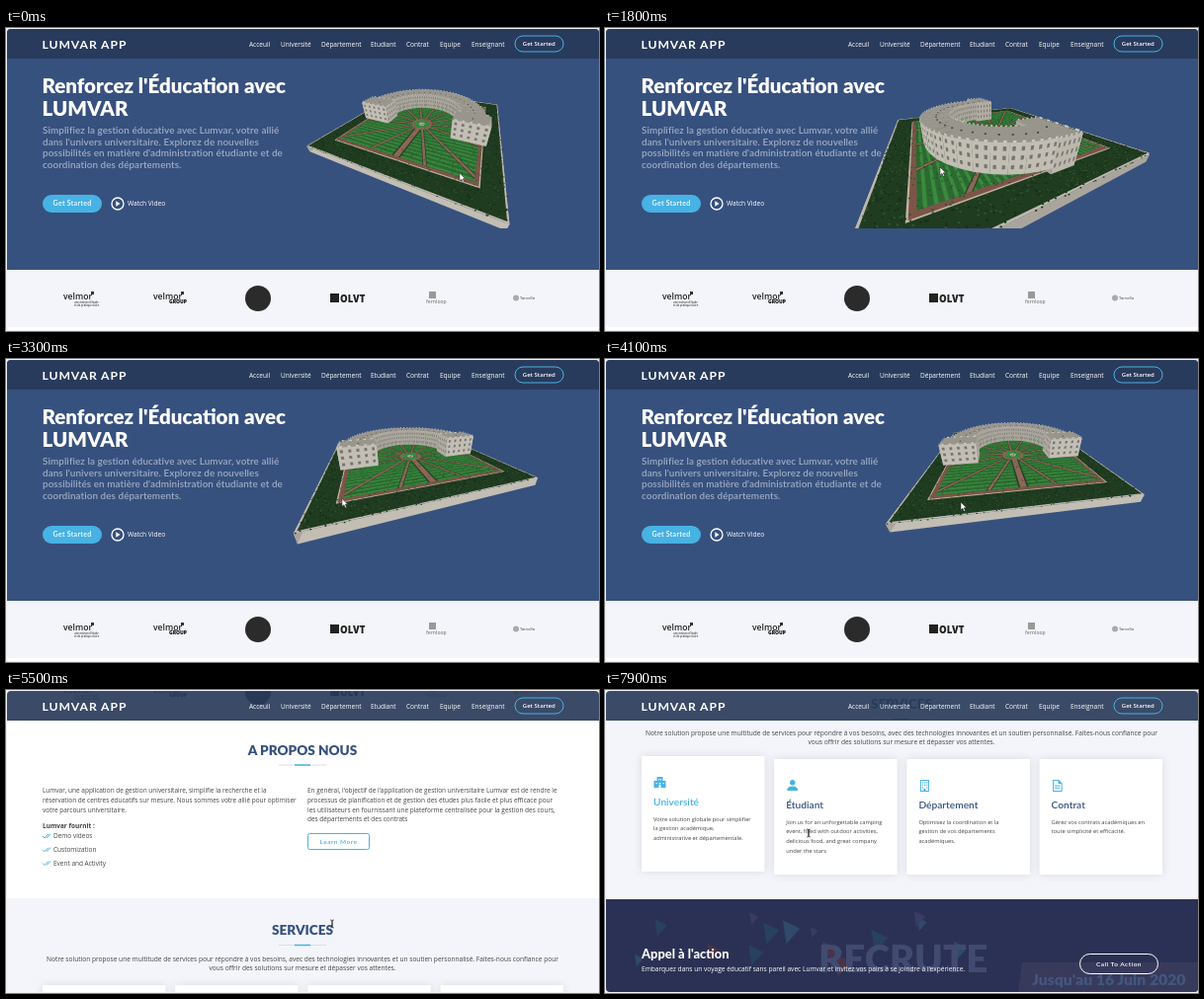
An HTML page with a canvas that plays this animation: 600 by 307 pixels, repeating every 8000 ms.

```html
<!DOCTYPE html>
<html lang="fr">
<head>
<meta charset="utf-8">
<style>
html, body { margin: 0; width: 600px; height: 307px; overflow: hidden; background: #f1f1f1; }
#stage { position: absolute; left: 1px; top: 1px; width: 599px; height: 305px; overflow: hidden; border-radius: 4px; background: #fff; }
#page, svg, canvas { position: absolute; left: 0; top: 0; }
#stage > * { margin: -1px 0 0 -1px; }
svg { overflow: visible; }
text { font-family: "Open Sans", sans-serif; font-size: 6.47px; fill: #444; white-space: pre; }
.j { font-family: Lato, sans-serif; }
.w, .w text { fill: #fff; }
.nav text { font-weight: 500; font-size: 6.5px; }
.title text { font-size: 20.5px; font-weight: 900; }
.lead text { font-size: 9.9px; font-weight: 600; fill: #9dabc4; letter-spacing: .08px; }
.head { font-weight: 900; font-size: 13.6px; fill: #37517e; text-anchor: middle; }
.intro { font-size: 6.6px; text-anchor: middle; }
.mid { text-anchor: middle; }
.tiny { font-size: 2.6px; }
.sky { fill: #47b2e4; }
.line { fill: none; stroke: #47b2e4; }
.card rect.box { fill: #fff; filter: drop-shadow(0 0 4px #0000001c); }
.card .j { font-size: 10.2px; fill: #37517e; font-weight: 600; }
.card text:not(.j) { font-size: 5.72px; }
</style>
</head>
<body>
<div id="stage">
<div id="page">
<svg width="600" height="900">
  <rect width="600" height="245" fill="#37517e"/>
  <g class="w title">
    <text class="j" x="36.5" y="66">Renforcez l'Éducation avec</text>
    <text class="j" x="36.5" y="89">LUMVAR</text>
  </g>
  <g class="lead">
    <text class="j" x="37" y="107">Simplifiez la gestion éducative avec Lumvar, votre allié</text>
    <text class="j" x="37" y="118.6">dans l'univers universitaire. Explorez de nouvelles</text>
    <text class="j" x="37" y="130.2">possibilités en matière d'administration étudiante et de</text>
    <text class="j" x="37" y="141.8">coordination des départements.</text>
  </g>
  <rect class="sky" x="37" y="169" width="60" height="18" rx="9"/>
  <text class="j w mid" x="67" y="180.4" style="font-size:7px" font-weight="600" letter-spacing=".3">Get Started</text>
  <circle cx="113" cy="178" r="6" fill="none" stroke="#fff" stroke-width="1.3"/>
  <path d="M111.3 175.3l4.2 2.7-4.2 2.7z" fill="#fff"/>
  <text class="w" x="123" y="180.3" style="font-size:6.6px" font-weight="500">Watch Video</text>

  <rect y="245" width="600" height="58" fill="#f3f5fa"/>
  <g font-weight="600">
    <text x="58" y="274.5" style="font-size:8.6px;fill:#222">velmor</text><rect x="86" y="267" width="3" height="3" fill="#333"/>
    <text class="tiny" x="69" y="278.6">une maison d'étude</text><text class="tiny" x="69" y="281.8">et de pratique claire</text>
    <text x="149" y="274.5" style="font-size:8.6px;fill:#222">velmor</text><rect x="177" y="267" width="3" height="3" fill="#333"/>
    <text x="165" y="279" style="font-size:5px;fill:#111" font-weight="800">GROUP</text>
    <circle cx="255" cy="274" r="13" fill="#2b2b2b"/>
    <rect x="328" y="269" width="9" height="9" fill="#222"/>
    <text x="338" y="277.6" style="font-size:9.6px;fill:#222" font-weight="800">OLVT</text>
    <rect x="428" y="267" width="7" height="7" fill="#999"/>
    <text x="425" y="279" style="font-size:5px;fill:#888">fernloop</text>
    <circle cx="516" cy="273.5" r="3" fill="#aaa"/>
    <text x="520" y="275" style="font-size:4px;fill:#666">Tarvello</text>
  </g>

  <rect y="303" width="600" height="180" fill="#fff"/>
  <text class="j head" x="300" y="338">A PROPOS NOUS</text>
  <path d="M276 348h48" stroke="#ddd"/><path d="M292 348h16" stroke="#47b2e4" stroke-width="1.5"/>
  <text x="37" y="376">Lumvar, une application de gestion universitaire, simplifie la recherche et la</text>
  <text x="37" y="386">réservation de centres éducatifs sur mesure. Nous sommes votre allié pour optimiser</text>
  <text x="37" y="395.6">votre parcours universitaire.</text>
  <text x="37" y="412" font-weight="700">Lumvar fournit :</text>
  <text x="48" y="422">Demo videos</text><text x="48" y="435.7">Customization</text><text x="48" y="449.5">Event and Activity</text>
  <path class="line" d="M37 420l2 2 4-4m-2 4l4-4M37 433.7l2 2 4-4m-2 4l4-4M37 447.5l2 2 4-4m-2 4l4-4"/>
  <text x="305" y="376">En général, l'objectif de l'application de gestion universitaire Lumvar est de rendre le</text>
  <text x="305" y="386">processus de planification et de gestion des études plus facile et plus efficace pour</text>
  <text x="305" y="395.6">les utilisateurs en fournissant une plateforme centralisée pour la gestion des cours,</text>
  <text x="305" y="405.4">des départements et des contrats</text>
  <rect class="line" x="305.5" y="417.5" width="62" height="16" rx="2"/>
  <text class="j mid" x="336.5" y="427.5" font-weight="600" letter-spacing=".5" style="fill:#47b2e4">Learn More</text>

  <rect y="483" width="600" height="230" fill="#f3f5fa"/>
  <text class="j head" x="300" y="520">SERVICES</text>
  <path d="M276 530.5h48" stroke="#ddd"/><path d="M292 530.5h16" stroke="#47b2e4" stroke-width="1.5"/>
  <text class="intro" x="300" y="546.5">Notre solution propose une multitude de services pour répondre à vos besoins, avec des technologies innovantes et un soutien personnalisé. Faites-nous confiance pour</text>
  <text class="intro" x="300" y="556.3">vous offrir des solutions sur mesure et dépasser vos attentes.</text>
  <g id="cards"></g>

  <rect y="713" width="600" height="187" fill="#2b3154"/>
  <g id="shards"></g>
  <text class="j" x="216" y="787" style="font-size:38.5px;fill:#414b70" font-weight="900">RECRUTE</text>
  <path d="M422 777h178v31H418z" fill="#383a5c"/>
  <text class="j" x="432" y="799.5" style="font-size:15.8px;fill:#43577f" font-weight="900">Jusqu'au 16 Juin 2020</text>
  <text class="j w" x="37" y="773" style="font-size:12.9px" font-weight="800">Appel à l'action</text>
  <text class="w" x="37" y="786" font-weight="500" style="font-size:6.6px">Embarquez dans un voyage éducatif sans pareil avec Lumvar et invitez vos pairs à se joindre à l'expérience.</text>
  <rect x="480.5" y="768.5" width="79" height="20" rx="10" fill="none" stroke="#fff"/>
  <text class="j w mid" x="520" y="780.6" font-weight="600" letter-spacing=".5">Call To Action</text>
</svg>
<canvas id="model" width="600" height="203"></canvas>
</div>
<svg width="600" height="307">
  <rect width="600" height="31" fill="#283a5a" fill-opacity=".91"/>
  <text class="j w" x="36.5" y="20.5" style="font-size:12.2px" letter-spacing=".9" font-weight="700">LUMVAR APP</text>
  <g class="w nav">
    <text x="246" y="18.5">Acceuil</text><text x="278" y="18.5">Université</text><text x="319" y="18.5">Département</text>
    <text x="369" y="18.5">Etudiant</text><text x="405" y="18.5">Contrat</text><text x="439" y="18.5">Equipe</text>
    <text x="471" y="18.5">Enseignant</text>
    <text class="mid" x="539.3" y="18.4" style="font-size:6px;font-weight:600">Get Started</text>
  </g>
  <rect class="line" x="515" y="8" width="49" height="16" rx="8"/>
  <path id="arrow" d="M0 0v8l1.9-1.7 1.4 3 1.3-.6-1.4-2.9h2.5z" fill="#fff" stroke="#222" stroke-width=".5"/>
  <path id="beam" d="M-1.8-4q1.8 0 1.8 1v6q0 1 1.8 1M1.8-4q-1.8 0-1.8 1v6q0 1-1.8 1" fill="none" stroke="#222" stroke-width=".8"/>
</svg>
</div>
<script>
const $ = id => document.getElementById(id);
const ctx = $('model').getContext('2d');
const rad = Math.PI / 180;

let seed = 7;
const rnd = () => (seed = seed * 16807 % 2147483647) / 2147483647;

// Service cards and background shards
const icons = [
  'M0 11V4h3V0h6v4h3v7H7V8H5v3zM4.5 2v1.4h1V2zm2 0v1.4h1V2zM2 6v1.2h1.2V6zm3 0v1.2h2V6zm4 0v1.2h1.2V6z',
  'M6 0a2.8 2.8 0 1 0 .01 0zM.5 11q0-4.5 5.5-4.5t5.5 4.5z',
  'M1 0h9v12H1zM2 1v10h2.5V9h2v2H9V1zm1 1.2h1.2v1.2H3zm2.3 0h1.2v1.2H5.3zM3 4.8h1.2V6H3zm2.3 0h1.2V6H5.3zm2.1-2.6h1v1.2h-1zm0 2.6h1V6h-1zM3 7.2h1.2v1.2H3zm4.4 0h1v1.2h-1z',
  'M1 0h6l3.5 3.5V12H1zM2 1v10h7.5V4H6.5V1zm1 4.5h5.3v1H3zm0 2.2h5.3v1H3z'];
const cards = [
  ['Université', 'Votre solution globale pour simplifier', 'la gestion académique,', 'administrative et départementale.'],
  ['Étudiant', 'Join us for an unforgettable camping', 'event, filled with outdoor activities,', 'delicious food, and great company', 'under the stars'],
  ['Département', 'Optimisez la coordination et la', 'gestion de vos départements', 'académiques.'],
  ['Contrat', 'Gérez vos contrats académiques en', 'toute simplicité et efficacité.']];
$('cards').innerHTML = cards.map(([title, ...lines], i) => {
  const x = 37 + i * 134.2;
  return `<g class="card"><rect class="box" x="${x}" y="571" width="124.4" height="117"/>
    <path class="sky" fill-rule="evenodd" transform="translate(${x + 12.5} 592)" d="${icons[i]}"/>
    <text class="j" x="${x + 12}" y="621">${title}</text>` +
    lines.map((s, k) => `<text x="${x + 12}" y="${636.5 + k * 9.8}">${s}</text>`).join('') + '</g>';
}).join('');
$('shards').innerHTML = Array.from({ length: 16 }, (_, i) => {
  const x = 30 + rnd() * 350, y = 718 + rnd() * 55, r = 5 + rnd() * 13;
  const fill = ['#2f4a6b', '#4a3348', '#27415f', '#3a3c66'][i % 4];
  return `<path fill="${fill}" d="M${x} ${y}l${r} ${r * .5}l${-r * .8} ${r * .9}z"/>`;
}).join('');

// Linear interpolation over rows of [time, ...values]
function at(keys, t) {
  let i = 0;
  while (i < keys.length - 2 && t > keys[i + 1][0]) i++;
  const [a, b] = [keys[i], keys[i + 1]];
  const k = Math.min(1, Math.max(0, (t - a[0]) / (b[0] - a[0])));
  return a.slice(1).map((v, j) => v + (b[j + 1] - v) * k);
}
const ease = (t, from, to) => {
  const k = Math.min(1, Math.max(0, (t - from) / (to - from)));
  return k * k * (3 - 2 * k);
};

// yaw, pitch, centre x, centre y, distance
const views = [
  [0, 22, 30, 425, 92, 1.95], [800, 84, 27, 447, 101, 1.75], [1800, 245, 22, 384, 106, 1.5],
  [2500, 333, 16, 400, 97, 1.9], [4100, 352, 25, 411, 92, 1.9]];
const pointer = [
  [0, 459, 147], [800, 416, 144], [1800, 339, 141], [2500, 320, 138], [4100, 360, 145], [4500, 345, 250],
  [5500, 330, 237], [6800, 330, 237], [7300, 230, 170], [7700, 130, 140], [7900, 206, 145]];

const W = .95, BACK = -.9, FRONT = 1, MID = .15;
const specks = Array.from({ length: 3600 }, () => [(rnd() * 2 - 1) * W, BACK + rnd() * (FRONT - BACK), rnd()])
  .map(([x, z, c]) => [x, z, c, Math.abs(x) > W - .18 || z < BACK + .18 || z > FRONT - .18]);

function drawModel(t) {
  const [yaw, pitch, cx, cy, dist] = at(views, t);
  const s = Math.sin(yaw * rad), c = Math.cos(yaw * rad), sp = Math.sin(pitch * rad), cp = Math.cos(pitch * rad);
  const project = ([x, y, z]) => {
    const u = x * c - z * s, v = x * s + z * c, d = dist - v * cp - y * sp;
    return [cx + 140 * u / d, cy + 140 * (v * sp - y * cp) / d, d];
  };
  const trace = pts => {
    ctx.beginPath();
    pts.forEach(p => ctx.lineTo(...project(p).slice(0, 2)));
    ctx.closePath();
  };
  const fill = (pts, color) => { trace(pts); ctx.fillStyle = color; ctx.fill(); };
  const rect = m => [[-W + m, 0, BACK + m], [W - m, 0, BACK + m], [W - m, 0, FRONT - m], [-W + m, 0, FRONT - m]];
  const wallOf = (a, b, low, high) => [[a[0], low, a[2]], [b[0], low, b[2]], [b[0], high, b[2]], [a[0], high, a[2]]];

  ctx.clearRect(0, 0, 600, 203);
  const base = rect(0);
  base.forEach((p, i) => fill(wallOf(p, base[(i + 1) % 4], -.08, 0), i % 2 ? '#aaa59c' : '#c3beb4'));
  fill(base, '#bdb8ad');
  fill(rect(.012), '#1f3b20');
  fill(rect(.18), '#c0b3a2');
  fill(rect(.19), '#7d5548');
  fill(rect(.225), '#2c6a32');

  ctx.save();
  trace(rect(.225));
  ctx.clip();
  for (let z = BACK + .25; z < FRONT; z += .05) fill([[-W, 0, z], [W, 0, z], [W, 0, z + .02], [-W, 0, z + .02]], '#3b8a3d');
  for (let i = 0; i < 14; i++) {
    const a = i * Math.PI / 7, w = i ? .02 : .045, dx = Math.sin(a), dz = Math.cos(a);
    const strip = (k, color) => fill([[dz * k, 0, MID - dx * k], [-dz * k, 0, MID + dx * k],
      [dx * 1.6 - dz * k, 0, MID + dz * 1.6 + dx * k], [dx * 1.6 + dz * k, 0, MID + dz * 1.6 - dx * k]], color);
    strip(w, '#2a3f24');
    strip(w * .65, '#8d6657');
  }
  ctx.restore();
  const ring = r => Array.from({ length: 24 }, (_, i) => [r * Math.cos(i * 15 * rad), 0, MID + r * Math.sin(i * 15 * rad)]);
  fill(ring(.13), '#8d6657');
  fill(ring(.1), '#3b8a3d');
  fill(ring(.04), '#aaa');
  for (const [x, z, k, hedge] of specks) {
    if (!hedge && k > .5) continue;
    const [px, py, d] = project([x, 0, z]);
    ctx.fillStyle = hedge ? (k > .6 ? '#35592f' : '#152c17') : '#235528';
    ctx.fillRect(px, py, 1.3 / d, 1 / d);
  }

  // Curved building: walls and roofs sorted from far to near
  const faces = [];
  const add = (pts, color, windows = 0) => {
    const depth = pts.reduce((sum, p) => sum + project(p)[2], 0) / pts.length;
    faces.push({ pts, color, windows, depth });
  };
  const box = (corners, h, windows, walls) => {
    corners.forEach((p, i) => walls[i] && add(wallOf(p, corners[(i + 1) % 4], 0, h), walls[i], windows));
    add(corners.map(([x, , z]) => [x, h, z]), '#98958d');
  };
  const arc = (r, a) => [r * Math.cos(a), 0, MID - r * Math.sin(a)];
  for (let i = 0; i < 22; i++) {
    const a = i * Math.PI / 22, b = a + Math.PI / 22;
    box([arc(.76, a), arc(.76, b), arc(.5, b), arc(.5, a)], .22, 2, ['#c2beb4', 0, '#aaa69d', 0]);
  }
  for (const k of [-1, 1])
    box([[k * .42, 0, .08], [k * .8, 0, .08], [k * .8, 0, .3], [k * .42, 0, .3]], .24, 5, ['#aaa69d', '#bbb7ad', '#c2beb4', '#b0aca3']);
  faces.sort((a, b) => b.depth - a.depth);
  for (const { pts, color, windows, depth } of faces) {
    fill(pts, color);
    const [a, b, top] = pts, h = top[1];
    const mix = k => [a[0] + (b[0] - a[0]) * k, 0, a[2] + (b[2] - a[2]) * k];
    for (let i = 0; i < windows; i++) {
      const p = mix((i + .32) / windows), q = mix((i + .68) / windows);
      for (const y of [.18, .48, .76]) fill(wallOf(p, q, h * y, h * (y + .13)), '#76746f');
      fill(wallOf(p, q, h, h * 1.06), '#d0ccc2');
    }
    if (!windows) {
      const [x, y] = project([(a[0] + top[0]) / 2, h, (a[2] + top[2]) / 2]);
      ctx.fillStyle = '#45443f';
      ctx.fillRect(x, y, 2 / depth, 1.5 / depth);
    }
  }
}

function frame(now) {
  const t = Math.floor(now % 8000 / 100) * 100;
  const scroll = 272 * ease(t, 4500, 5500) + 229 * ease(t, 5900, 6800);
  $('page').style.transform = `translateY(${-scroll}px)`;
  if (scroll < 210) drawModel(t);

  const [x, y] = at(pointer, t);
  const typing = t >= 5300;
  $('arrow').setAttribute('visibility', typing ? 'hidden' : 'visible');
  $('beam').setAttribute('visibility', typing ? 'visible' : 'hidden');
  $(typing ? 'beam' : 'arrow').setAttribute('transform', `translate(${x} ${y})`);

  const card = $('cards').firstChild;
  card.setAttribute('transform', `translate(0 ${-3 * ease(t, 7600, 7900)})`);
  card.querySelector('.j').style.fill = t >= 7600 ? '#47b2e4' : '';
  requestAnimationFrame(frame);
}
requestAnimationFrame(frame);
</script>
</body>
</html>
```
